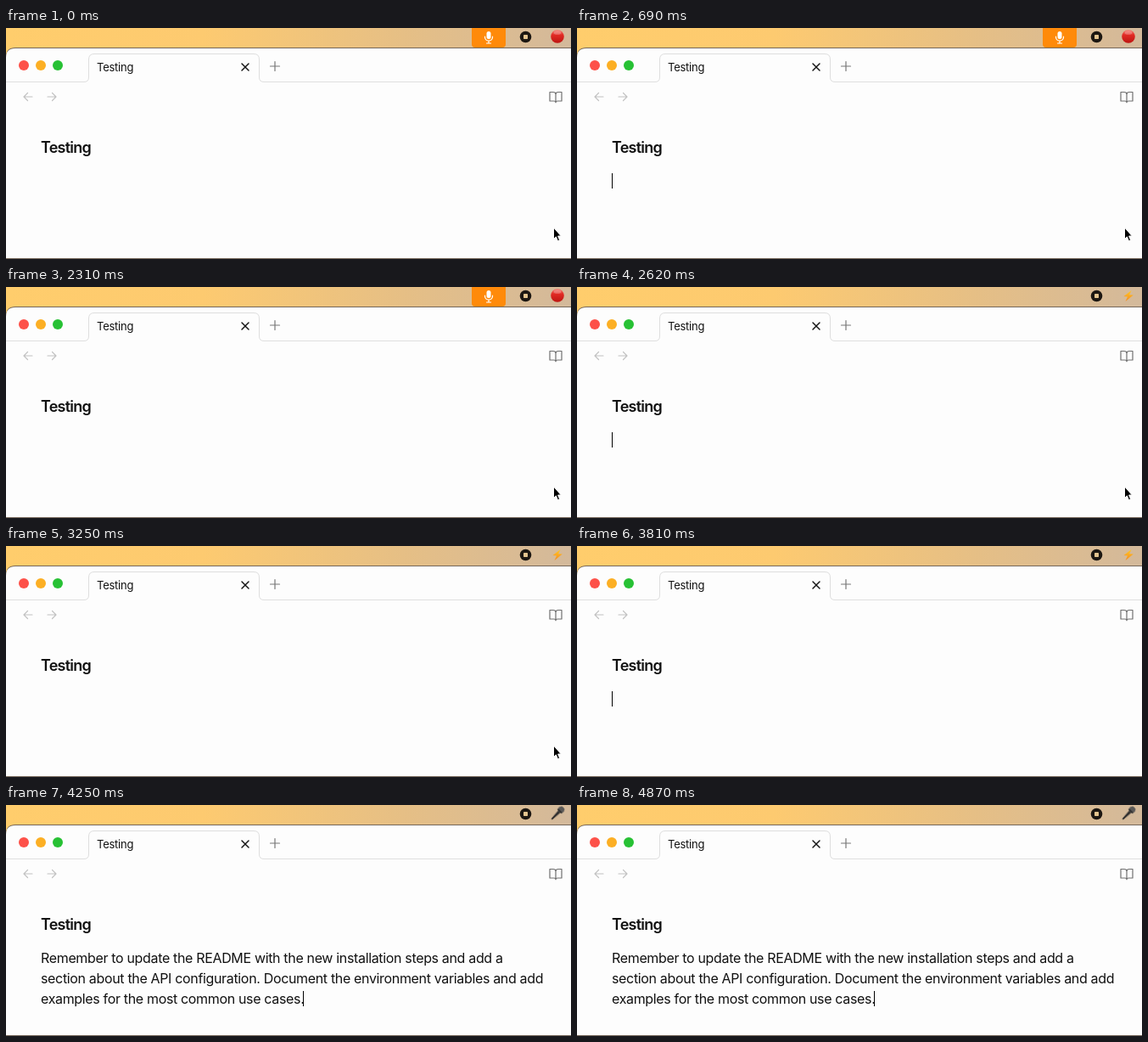
An HTML page that plays this animation: 666 px wide and 272 px high, repeating every 5060 ms.

```html
<!DOCTYPE html>
<html lang="en">
<head>
<meta charset="utf-8">
<title>Dictation</title>
<style>
  html, body { margin: 0; width: 100%; height: 100%; overflow: hidden; background: #fdfdfd; }
  svg { display: block; width: 666px; height: 272px; }
  text { font-family: Inter, "Open Sans", sans-serif; fill: #111; }
  .tab-name { font-size: 13px; letter-spacing: -.25px; }
  .title { font-size: 18px; font-weight: 600; letter-spacing: -.75px; }
  .body { font-size: 16px; letter-spacing: -.34px; }
  .line { fill: none; stroke-linecap: round; stroke-linejoin: round; }

  .caret, .note, .mouse, .dot, .bolt, .mic { animation: 5060ms step-end infinite; }
  .caret { animation-name: blink; }
  .note { animation-name: note; }
  .mouse { animation-name: mouse; }
  .dot { animation-name: dot; }
  .bolt { animation-name: bolt; }
  .mic { animation-name: mic; }
  .pill { animation: pill 5060ms linear infinite; }

  /* 500 ms on, 500 ms off; jumps to the end of the note once it is inserted */
  @keyframes blink {
    0%, 17.19%, 36.95%, 56.71% { opacity: 0; transform: none; }
    7.31%, 27.07%, 46.83%, 66.6% { opacity: 1; transform: none; }
    76.48%, 96.24% { opacity: 1; transform: translate(309px, 48px); }
    86.36% { opacity: 0; transform: translate(309px, 48px); }
  }
  @keyframes note { 0% { opacity: 0; } 76.48%, 100% { opacity: 1; } }
  @keyframes mouse { 0% { opacity: 1; } 75.29%, 100% { opacity: 0; } }
  @keyframes dot { 0% { opacity: 1; } 48.22%, 100% { opacity: 0; } }
  @keyframes bolt { 0%, 77.86%, 100% { opacity: 0; } 48.22% { opacity: 1; } }
  @keyframes mic { 0% { opacity: 0; } 77.86%, 100% { opacity: 1; } }
  @keyframes pill { 0%, 46.83% { opacity: 1; } 51.7%, 100% { opacity: 0; } }
</style>
</head>
<body>
<svg viewBox="0 0 666 272">
  <defs>
    <linearGradient id="bar">
      <stop offset="0" stop-color="#ffcd6c"/>
      <stop offset=".35" stop-color="#fdca70"/>
      <stop offset=".7" stop-color="#e6bf85"/>
      <stop offset="1" stop-color="#d3b99b"/>
    </linearGradient>
    <linearGradient id="gloss" x2="0" y2="1">
      <stop offset="0" stop-color="#f4766b"/>
      <stop offset=".4" stop-color="#e02a24"/>
      <stop offset="1" stop-color="#bd1512"/>
    </linearGradient>
    <linearGradient id="spark" x2="0" y2="1">
      <stop offset="0" stop-color="#ffc928"/>
      <stop offset="1" stop-color="#f58a1c"/>
    </linearGradient>
    <path id="arrow" class="line" d="M5 0H-5M-.5-4.5L-5 0L-.5 4.5" stroke="#c2c2c2" stroke-width="1.2"/>
  </defs>

  <!-- menu bar -->
  <rect width="666" height="40" fill="url(#bar)"/>
  <g class="pill">
    <rect x="549" y="-5" width="40" height="28" rx="4" fill="#ff8a0a"/>
    <rect x="566.5" y="4" width="5" height="9" rx="2.5" fill="#fff"/>
    <path class="line" d="M564.5 10v.7a4.5 4.3 0 0 0 9 0V10M569 15v3M566.5 18h5" stroke="#fff" stroke-width="1.2"/>
  </g>
  <circle cx="612.5" cy="10.5" r="6.8" fill="#1c1712"/>
  <rect x="610" y="8" width="5" height="5" rx=".7" fill="#e3c48f"/>
  <g class="dot">
    <circle cx="650" cy="10" r="7.8" fill="url(#gloss)"/>
    <ellipse cx="650" cy="5.5" rx="4.5" ry="2.3" fill="#fff" opacity=".25"/>
  </g>
  <path class="bolt" d="M653.5 4L644.5 11L649 11.4L646.5 17L655.8 9.6L651.2 9.2Z" fill="url(#spark)"/>
  <g class="mic" transform="rotate(45 650 10)">
    <path d="M648.3 7H651.7L650.9 19.5H649.1Z" fill="#2c2b2b"/>
    <circle cx="650" cy="3.8" r="3.8" fill="#5a5856"/>
    <rect x="646.5" y="5" width="7" height="2" rx="1" fill="#353433"/>
  </g>

  <!-- window -->
  <path d="M0 272V34Q0 23 11 23H666V272Z" fill="#75675a"/>
  <path d="M0 271V35Q0 24 11 24H666V271Z" fill="#fdfdfd"/>
  <path d="M0 63.5H92Q97.5 63.5 97.5 58V37Q97.5 30.5 104 30.5H292Q298.5 30.5 298.5 37V58Q298.5 63.5 304 63.5H666" fill="none" stroke="#dedede"/>
  <circle cx="21" cy="44" r="6" fill="#fd5149"/>
  <circle cx="41" cy="44" r="6" fill="#fcaf24"/>
  <circle cx="61" cy="44" r="6" fill="#27c134"/>
  <text class="tab-name" x="107" y="51">Testing</text>
  <path class="line" d="M278 42L286 50M286 42L278 50" stroke="#151515" stroke-width="1.5"/>
  <path class="line" d="M311.5 45H322.5M317 39.5V50.5" stroke="#777" stroke-width="1.2"/>
  <use href="#arrow" transform="translate(26 81)"/>
  <use href="#arrow" transform="translate(54 81) scale(-1 1)"/>
  <path class="line" d="M648 77.5V87.5M641 75.5H645Q648 75.5 648 78.2Q648 75.5 651 75.5H655V86H650.3Q648 86 648 87.7Q648 86 645.7 86H641Z" stroke="#707070" stroke-width="1.2"/>

  <!-- page -->
  <text class="title" x="41" y="147">Testing</text>
  <g class="note">
    <text class="body" x="41" y="186">Remember to update the README with the new installation steps and add a</text>
    <text class="body" x="41" y="210">section about the API configuration. Document the environment variables and add</text>
    <text class="body" x="41" y="234">examples for the most common use cases.</text>
  </g>
  <rect class="caret" x="41" y="171" width="1" height="18" fill="#000"/>
  <path class="mouse" d="M645.5 235V248.5L648.4 245.8L650.4 250.7L652.6 249.7L650.6 245H654.3Z" fill="#000" stroke="#fff"/>
</svg>
</body>
</html>
```
